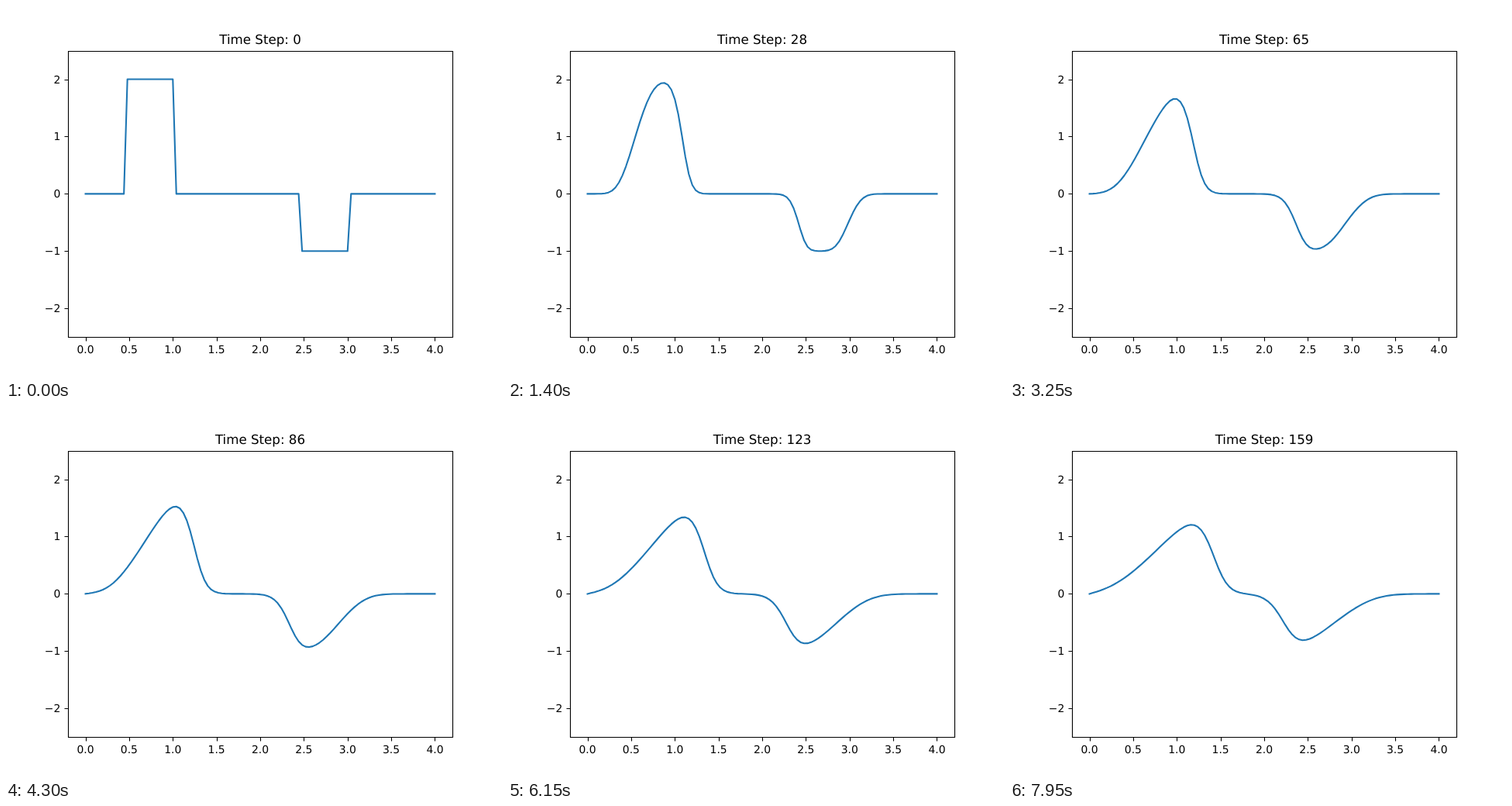
Recreate the animation shown at these times as an HTML page. Size 640 by 480 pixels, loop 8000 ms.

```html
<!DOCTYPE html>
<html lang="en">
<head>
<meta charset="utf-8">
<title>Burgers equation</title>
<style>
  html, body { margin: 0; width: 100%; height: 100%; overflow: hidden; background: #fff; }
  svg { display: block; width: 640px; height: 480px; }
  text { font: 13.889px "DejaVu Sans", sans-serif; text-rendering: geometricPrecision; }
  #title { font-size: 16.667px; }
  #frame { fill: none; stroke: #000; stroke-width: 1.111; }
  #curve { fill: none; stroke: #1f77b4; stroke-width: 2.083; stroke-linejoin: round; stroke-linecap: square; }
</style>
</head>
<body>
<svg viewBox="0 0 640 480">
  <path id="frame"/>
  <path id="curve"/>
  <g id="labels"></g>
  <text id="title" x="328" y="49" text-anchor="middle"></text>
</svg>
<script>
const STEP_MS = 50, STEPS = 160;
const POINTS = 101, DX = 4 / (POINTS - 1), VISCOSITY = 0.07, DT = DX * VISCOSITY;

const byId = id => document.getElementById(id);
const toX = x => 102.545 + x * 112.727;
const toY = u => 242.4 - u * 73.92;

// Viscous Burgers equation: backward difference for advection, central for diffusion.
function advance(u) {
  return u.map((v, i) => i === 0 || i === POINTS - 1 ? v :
    v - v * DT / DX * (v - u[i - 1])
      + VISCOSITY * DT / DX ** 2 * (u[i + 1] - 2 * v + u[i - 1]));
}

const initial = Array.from({ length: POINTS }, (_, i) =>
  i >= 12 && i <= 25 ? 2 : i >= 62 && i <= 75 ? -1 : 0);
const states = [initial];
while (states.length < STEPS) states.push(advance(states.at(-1)));

const curves = states.map(u => "M" + u.map((v, i) =>
  toX(i * DX).toFixed(2) + " " + toY(v).toFixed(2)).join("L"));

function addLabel(text, x, y, anchor) {
  const label = document.createElementNS("http://www.w3.org/2000/svg", "text");
  label.setAttribute("x", x);
  label.setAttribute("y", y);
  label.setAttribute("text-anchor", anchor);
  label.textContent = text;
  byId("labels").append(label);
}

function drawAxes() {
  let path = "M80.5 58.5H576.5V427.5H80.5Z";
  for (let x = 0; x <= 4; x += 0.5) {
    path += `M${Math.round(toX(x)) + 0.5} 427.5v5`;
    addLabel(x.toFixed(1), toX(x), 448, "middle");
  }
  for (let u = -2; u <= 2; u++) {
    const y = Math.round(toY(u));
    path += `M80.5 ${y + 0.5}h-5`;
    addLabel(String(u).replace("-", "\u2212"), 70.3, y + 5, "end");
  }
  byId("frame").setAttribute("d", path);
}

function render() {
  const step = Math.floor(performance.now() / STEP_MS) % STEPS;
  byId("curve").setAttribute("d", curves[step]);
  byId("title").textContent = `Time Step: ${step}`;
  requestAnimationFrame(render);
}

drawAxes();
render();
</script>
</body>
</html>
```
